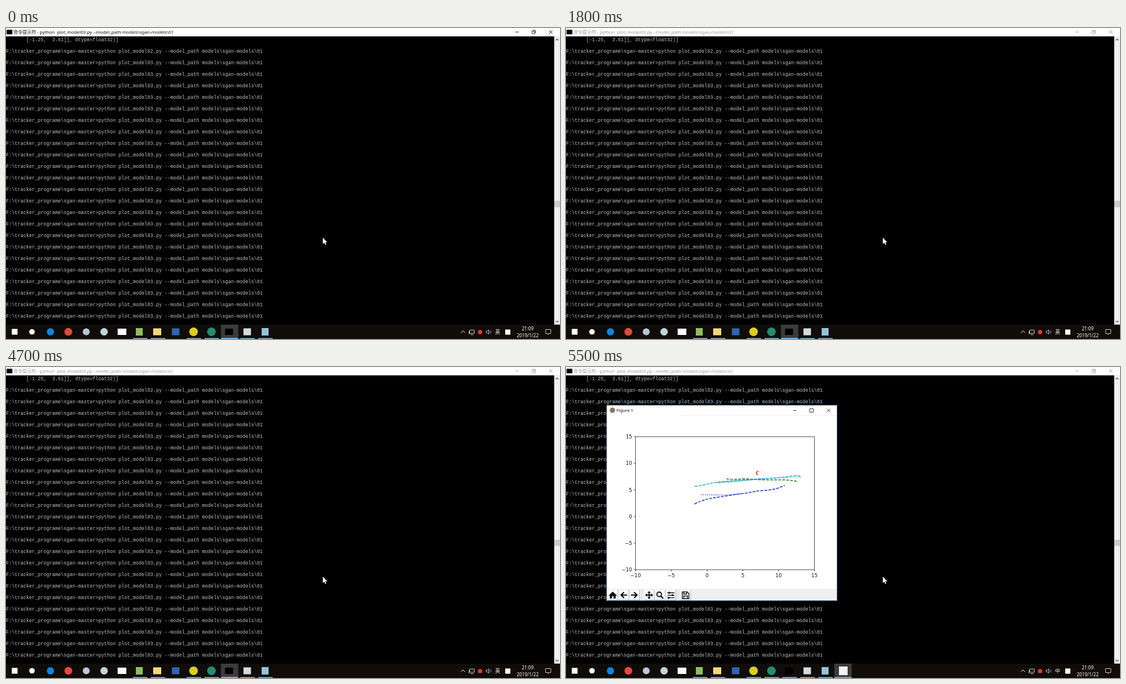
An HTML page with a canvas that plays this animation: 960 by 540 pixels, repeating every 5.6 s.

```html
<!DOCTYPE html>
<html lang="zh-CN">
<head>
<meta charset="utf-8">
<title>Terminal and figure window</title>
<style>
  html, body { margin: 0; width: 100%; height: 100%; overflow: hidden; background: #000; }
  canvas { display: block; width: 960px; height: 540px; }
</style>
</head>
<body>
<canvas id="stage" width="960" height="540"></canvas>
<script>
const ctx = document.getElementById('stage').getContext('2d');
const LOOP = 5600, BLUR_AT = 100, OPEN_AT = 4800, SHOWN_AT = 4900, PLOT_AT = 5000;
const UI = '"Noto Sans", "Noto Sans CJK SC", "Noto Sans CJK", sans-serif';
const MONO = '"Liberation Mono", monospace';
const COMMAND = 'python plot_model03.py --model_path models\\sgan-models\\01';

function rect(x, y, w, h, color) {
  ctx.fillStyle = color;
  ctx.fillRect(x, y, w, h);
}
function disc(x, y, r, color) {
  ctx.fillStyle = color;
  ctx.beginPath();
  ctx.arc(x, y, r, 0, Math.PI * 2);
  ctx.fill();
}
function text(str, x, y, size, color, family = UI, align = 'left') {
  ctx.font = `${size}px ${family}`;
  ctx.textAlign = align;
  ctx.fillStyle = color;
  ctx.fillText(str, x, y);
}
function stroke(path, color, width = 1) {
  ctx.strokeStyle = color;
  ctx.lineWidth = width;
  ctx.stroke(new Path2D(path));
}
function fill(path, color) {
  ctx.fillStyle = color;
  ctx.fill(new Path2D(path));
}

// Minimise, maximise or restore, and close, centred on the given x positions.
function windowButtons(xs, y, color, restore) {
  const [a, b, c] = xs;
  stroke(`M${a - 3} ${y}h6`, color, 0.9);
  if (restore) {
    stroke(`M${b - 3} ${y - 1.5}h4.5v4.5h-4.5zM${b - 1.5} ${y - 1.5}v-1.5h4.5v4.5h-1.5`, color, 0.8);
  } else {
    stroke(`M${b - 3} ${y - 3}h6v6h-6z`, color, 0.9);
  }
  stroke(`M${c - 3} ${y - 3}l6 6m0 -6l-6 6`, color, 0.9);
}

function drawConsole(active) {
  rect(0, 0, 960, 540, '#000');
  text('[-1.25,  3.61]], dtype=float32)]', 35, 23, 8.333, '#c0c0c0', MONO);
  for (let row = 0; row < 24; row++) {
    const command = row ? COMMAND : COMMAND.replace('03', '02');
    text('F:\\tracker_programe\\sgan-master>' + command, 0, 43 + row * 20, 8.333, '#c0c0c0', MONO);
  }

  const ink = active ? '#111' : '#999';
  rect(0, 0, 960, 14.5, '#fff');
  rect(1, 3, 10, 8, '#000');
  text('命令提示符 - python  plot_model03.py --model_path models\\sgan-models\\01', 13, 10, 7.8, ink);
  windowButtons([885.5, 914.5, 944], 7, ink, true);

  rect(950, 14, 10, 501, '#f0f0f0');
  rect(950, 300, 10, 11, '#cdcdcd');
  stroke('M952.5 21.5l2.5-2.5 2.5 2.5M952.5 508.5l2.5 2.5 2.5-2.5', '#555', 1.2);
}

const roundIcons = [
  [45, 4.8, '#fff'], [77, 6.3, '#1683d8'], [108, 6.8, '#df4a3b'], [139, 6, '#b7c6d8'],
  [170, 6.5, '#c2d2da'], [325, 7.5, '#dccb22'], [356, 7.5, '#278b70']
];
const squareIcons = [
  [15, 10, 10, '#fff'], [201, 15, 11, '#fff'], [231, 12, 13, '#8fbd5c'], [262, 14, 12, '#f5d57a'],
  [294, 13, 12, '#2e65b4'], [386.5, 14, 11, '#000'], [418, 13, 12, '#d2dbe0'], [449, 12, 13, '#91c3d8']
];

function drawTaskbar(time) {
  const opened = time >= OPEN_AT, shown = time >= SHOWN_AT;
  rect(0, 515, 960, 25, '#100c09');
  rect(opened ? 465 : 372.5, 515, 30, 25, '#3d3b39');
  for (const x of [232, 263, 325, 356, 387, 418, 449]) rect(x - 12, 538.5, 25, 1.5, '#8bbce0');
  if (!opened) rect(372.5, 538.5, 30, 1.5, '#8bbce0');
  if (shown) rect(465, 538.5, 30, 1.5, '#8bbce0');
  for (const [x, r, color] of roundIcons) disc(x, 527.5, r, color);
  for (const [x, w, h, color] of squareIcons) rect(x - w / 2, 527.5 - h / 2, w, h, color);
  if (shown) rect(473, 520, 15, 15, '#f4f4f4');

  stroke('M788 529.5l3.8-3.8 3.8 3.8', '#eee', 1);
  stroke('M803.5 524.5h8v5.5h-8zM805 532.5h5M802.5 526v6', '#ddd', 0.9);
  disc(821.5, 528, 3.8, '#e33a24');
  stroke('M832 526.2h2l2.5-2.2v7.5l-2.5-2.2h-2z', '#ddd', 0.8);
  stroke('M838 526q1.4 1.8 0 3.6M839.7 524.7q2.5 3 0 6.2', '#999', 0.8);
  text(shown ? '中' : '英', 852, 531, 8.8, '#fff', UI, 'center');
  rect(865, 523.5, 9, 9, '#fff');
  text('21:09', 904, 525, 8, '#fff', UI, 'center');
  text('2019/1/22', 904, 537, 8, '#fff', UI, 'center');
  stroke('M935 523.5h9v7h-3l-1.5 2v-2h-4.5z', '#ddd', 0.9);
}

function curve(points, color, dash) {
  ctx.beginPath();
  ctx.moveTo(...points[0]);
  for (let i = 1; i < points.length - 1; i++) {
    const [x, y] = points[i], [nx, ny] = points[i + 1];
    ctx.quadraticCurveTo(x, y, (x + nx) / 2, (y + ny) / 2);
  }
  ctx.lineTo(...points[points.length - 1]);
  ctx.setLineDash(dash);
  ctx.strokeStyle = color;
  ctx.lineWidth = 1.5;
  ctx.stroke();
  ctx.setLineDash([]);
}

function drawPlot() {
  const axis = { left: 120.5, right: 430.5, top: 121, bottom: 352 };
  const dashed = [4.8, 2.1], dotted = [1.3, 2.1];
  ctx.strokeStyle = '#222';
  ctx.lineWidth = 0.8;
  ctx.strokeRect(axis.left, axis.top, axis.right - axis.left, axis.bottom - axis.top);
  for (let i = 0; i <= 5; i++) {
    const label = String(i * 5 - 10).replace('-', '\u2212');
    const x = axis.left + i * 62, y = axis.bottom - i * 46.2;
    stroke(`M${x} ${axis.bottom}v3M${axis.left} ${y}h-3`, '#222', 0.8);
    text(label, x, 365, 8.68, '#111', '"DejaVu Sans", sans-serif', 'center');
    text(label, 114.5, y + 3.2, 8.68, '#111', '"DejaVu Sans", sans-serif', 'right');
  }
  const cyan = '#22a9c6', green = '#178017', blue = '#1630d8';
  curve([[278, 194], [284, 195.5], [300, 194.5], [318, 194], [335, 196], [360, 196], [385, 196], [400, 198.5]], green, dashed);
  curve([[262, 200.5], [290, 198], [320, 196], [345, 194.5]], green, dotted);
  curve([[223, 207.5], [240, 204.5], [262, 199.5], [290, 197.5], [320, 195], [345, 194], [370, 192.5], [390, 189.5], [401, 188.5], [407, 190]], cyan, dashed);
  curve([[264, 201.5], [300, 199], [330, 194.5], [365, 192], [409, 191]], cyan, dotted);
  curve([[222.5, 238], [235, 232], [248, 228.5], [270, 225], [300, 220.5], [318, 218], [333, 215], [350, 214], [365, 211.5], [379, 205.5]], blue, dashed);
  curve([[234, 221.5], [260, 222.5], [285, 222], [305, 219.5]], blue, dotted);
  stroke('M333 181q-3 .5 -3 3t3 3', '#e02c22', 1.6);
  rect(335, 181, 1.4, 1.4, '#888');
}

function drawToolbar() {
  rect(71, 385, 399, 20.5, '#f0f0f0');
  for (const x of [81, 100, 118.5, 144, 163, 181.5, 207]) {
    rect(x - 8.5, 387, 17.5, 17.5, '#fafafa');
    stroke(`M${x - 8.5} 404.5h17.5v-17.5`, '#aaa', 0.9);
  }
  stroke('M131.5 388v16M194.5 388v16', '#ccc', 0.8);
  const ink = '#111';
  fill('M81 390l7 6.5-1 1-1-1v5.5h-3.7v-4h-2.6v4H76v-5.5l-1 1-1-1z', ink);
  stroke('M106 396h-10M100.5 391l-5 5 5 5', ink, 2.2);
  stroke('M112.5 396h10M118 391l5 5-5 5', ink, 2.2);
  stroke('M144 391v10M139 396h10', ink, 1.8);
  fill('M144 389l3 3.3h-6zM144 403l3-3.3h-6zM137 396l3.3-3v6zM151 396l-3.3-3v6z', ink);
  ctx.beginPath();
  ctx.arc(161.5, 394.7, 4, 0, Math.PI * 2);
  ctx.lineWidth = 1.9;
  ctx.stroke();
  stroke('M164.5 398l4 4', ink, 2.4);
  stroke('M175.5 392h12.5M175.5 396.3h12.5M175.5 400.6h12.5', ink, 1.3);
  stroke('M179 390.3v3.5M184.5 394.6v3.5M178 398.9v3.5', ink, 2.3);
  stroke('M201.5 390.5h8.5l3 3v8.5h-11.5zM204 390.5v3.7h5v-3.7M204 402v-4.5h6.5v4.5', ink, 1.4);
}

function drawFigure(time) {
  const shown = time >= SHOWN_AT;
  const w = shown ? 400 : 397.5, h = shown ? 340 : 338;
  ctx.globalAlpha = shown ? 1 : 0.81;
  rect(70, 66, w, h, '#fff');
  ctx.globalAlpha = 1;
  if (shown) {
    rect(200, 84, 269, 0.8, '#eee');
    drawToolbar();
    if (time >= PLOT_AT) drawPlot();
  } else {
    rect(70, 66, w, 18.5, 'rgba(255,255,255,.12)');
  }
  stroke(`M70.5 66.5h${w - 1}v${h - 1}h${1 - w}z`, shown ? '#3d82bd' : '#86a5b8', 0.8);
  disc(80.5, 75, 4.6, '#8c7552');
  text('Figure 1', 87.5, 78, 7.7, '#111');
  windowButtons(shown ? [396.5, 425.5, 455] : [394.5, 423.5, 452.5], 75.5, '#222', false);
}

function drawCursor() {
  fill('M549 364v11l2.5-2.3 1.7 3.8 1.8-.8-1.7-3.7h3.4z', '#fff');
}

function frame(now) {
  const time = now % LOOP;
  drawConsole(time < BLUR_AT);
  drawTaskbar(time);
  if (time >= OPEN_AT) drawFigure(time);
  drawCursor();
  requestAnimationFrame(frame);
}
requestAnimationFrame(frame);
</script>
</body>
</html>
```
